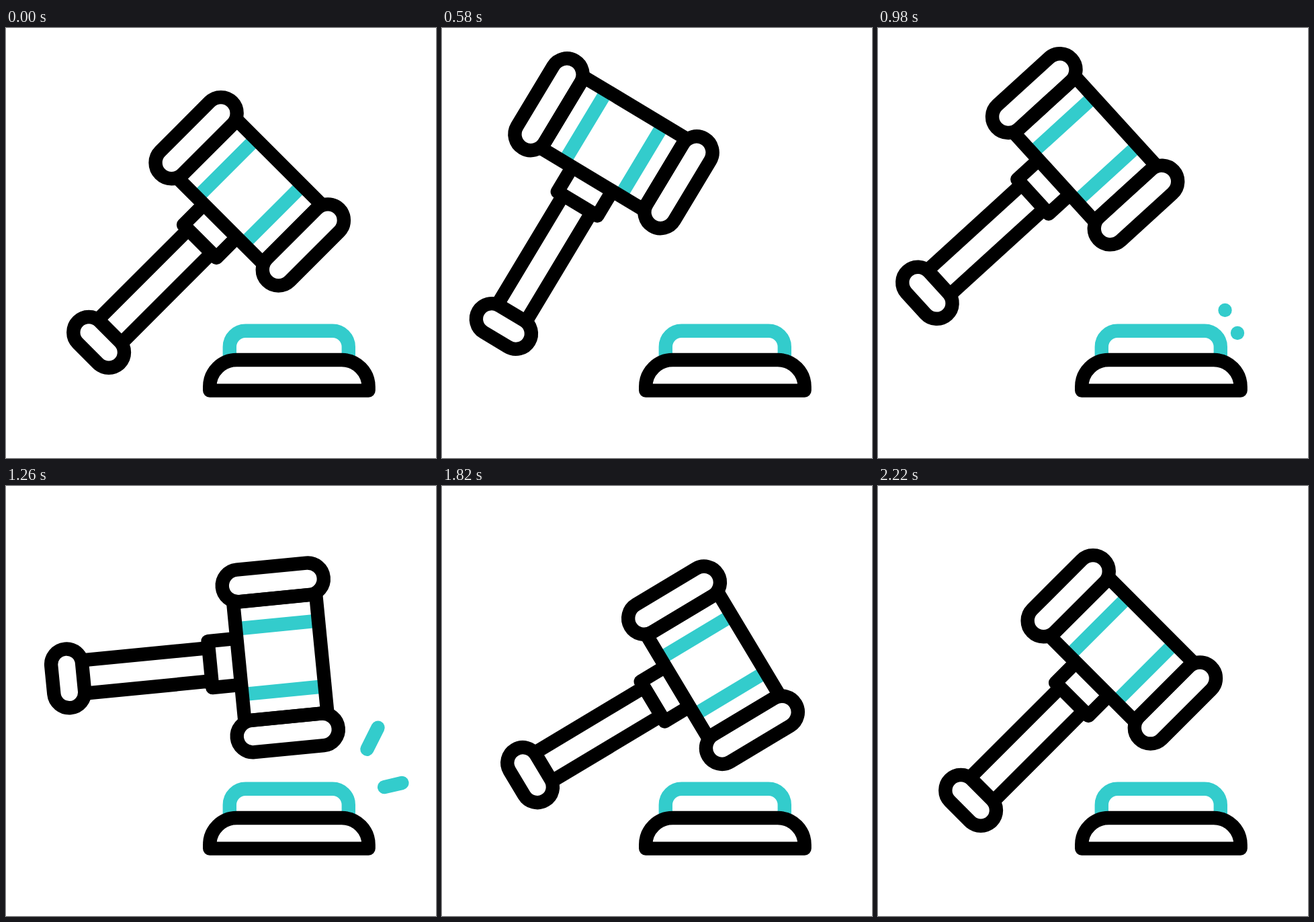
Recreate the animation shown at these times as an HTML page. Size 640 px wide and 640 px high, loop 2400 ms.

```html
<!DOCTYPE html>
<html lang="en">
<head>
<meta charset="utf-8">
<title>Gavel</title>
<style>
  html, body { margin: 0; width: 100%; height: 100%; overflow: hidden; background: #fff; }
  svg { display: block; width: 100vw; height: 100vh; }
  g { fill: none; stroke: #000; stroke-width: 20.4; stroke-linejoin: round; }
  .accent { stroke: #33cccc; }
  .spark { stroke-linecap: round; }
</style>
</head>
<body>
<svg viewBox="0 0 640 640">
  <g>
    <path class="accent" d="M332.8 488V474.5A23.7 23.7 0 0 1 356.5 450.8H486.1A23.7 23.7 0 0 1 509.8 474.5V488"/>
    <path d="M303.2 539.6V534A40 40 0 0 1 343.2 494H499.6A40 40 0 0 1 539.6 534V539.6Z"/>
  </g>
  <g class="accent spark" id="sparks"><path/><path/></g>
  <!-- The handle runs along x, from its knob at x = -200 to the head. -->
  <g id="hammer">
    <g transform="translate(-200)">
      <path class="accent" d="M260 -49H376M260 49H376"/>
      <path d="M24 -24.7H213M24 24.7H213M256 -34.7H213V34.7H256"/>
      <rect x="256" y="-88.6" width="123.6" height="177.2"/>
      <rect x="-22.8" y="-44" width="46" height="88" rx="23"/>
      <rect x="242" y="-136.4" width="151.6" height="47.6" rx="23.8"/>
      <rect x="242" y="88.8" width="151.6" height="47.6" rx="23.8"/>
    </g>
  </g>
</svg>
<script>
const LOOP = 2400;

const rest = { at: [279.4, 326.6], angle: 45 };
const raised = { at: [165.5, 255], angle: 63.6 };
const struck = { at: [290.3, 265.3], angle: 5.2 };

const moves = [
  { a: rest, b: raised, from: 0, to: 830, bend: [1.5, 0], power: 1.1 },
  { a: raised, b: struck, from: 830, to: 1200, bend: [11, 1], power: 1 },
  { a: struck, b: rest, from: 1200, to: 2236, bend: [21, 24.5], power: 1 }
];

const rays = [
  { a: [516.5, 420], b: [571, 304], bend: [5, 8.5] },
  { a: [535, 454], b: [627, 432], bend: [0, 1] }
];
const SPARK = { show: 960, head: 994, tail: 1086, span: 476 };

const hammer = document.getElementById('hammer');
const sparks = document.getElementById('sparks');

const mix = (a, b, p) => a + (b - a) * p;

// Eased progress of a span of time.
function ease(t, from, to, power = 1) {
  const x = Math.min(1, Math.max(0, (t - from) / (to - from))) ** power;
  return x * x * (3 - 2 * x);
}

// Point on the way from a to b, pushed aside most at the middle.
const arc = (a, b, bend, p) =>
  a.map((v, i) => mix(v, b[i], p) + 4 * p * (1 - p) * bend[i]);

function draw(t) {
  const { a, b, from, to, bend, power } = moves.find(m => t < m.to) || moves[2];
  const p = ease(t, from, to, power);
  hammer.setAttribute('transform',
    `translate(${arc(a.at, b.at, bend, p)}) rotate(${-mix(a.angle, b.angle, p)})`);

  const { show, head, tail, span } = SPARK;
  sparks.style.display = t >= show && t < tail + span ? '' : 'none';
  const ends = [tail, head].map(s => ease(t, s, s + span));
  rays.forEach((r, i) => {
    const points = ends.map(e => arc(r.a, r.b, r.bend, e));
    sparks.children[i].setAttribute('d', `M${points.join('L')}`);
  });
}

const start = performance.now();
function tick() {
  draw((performance.now() - start) % LOOP);
  requestAnimationFrame(tick);
}
tick();
</script>
</body>
</html>
```
